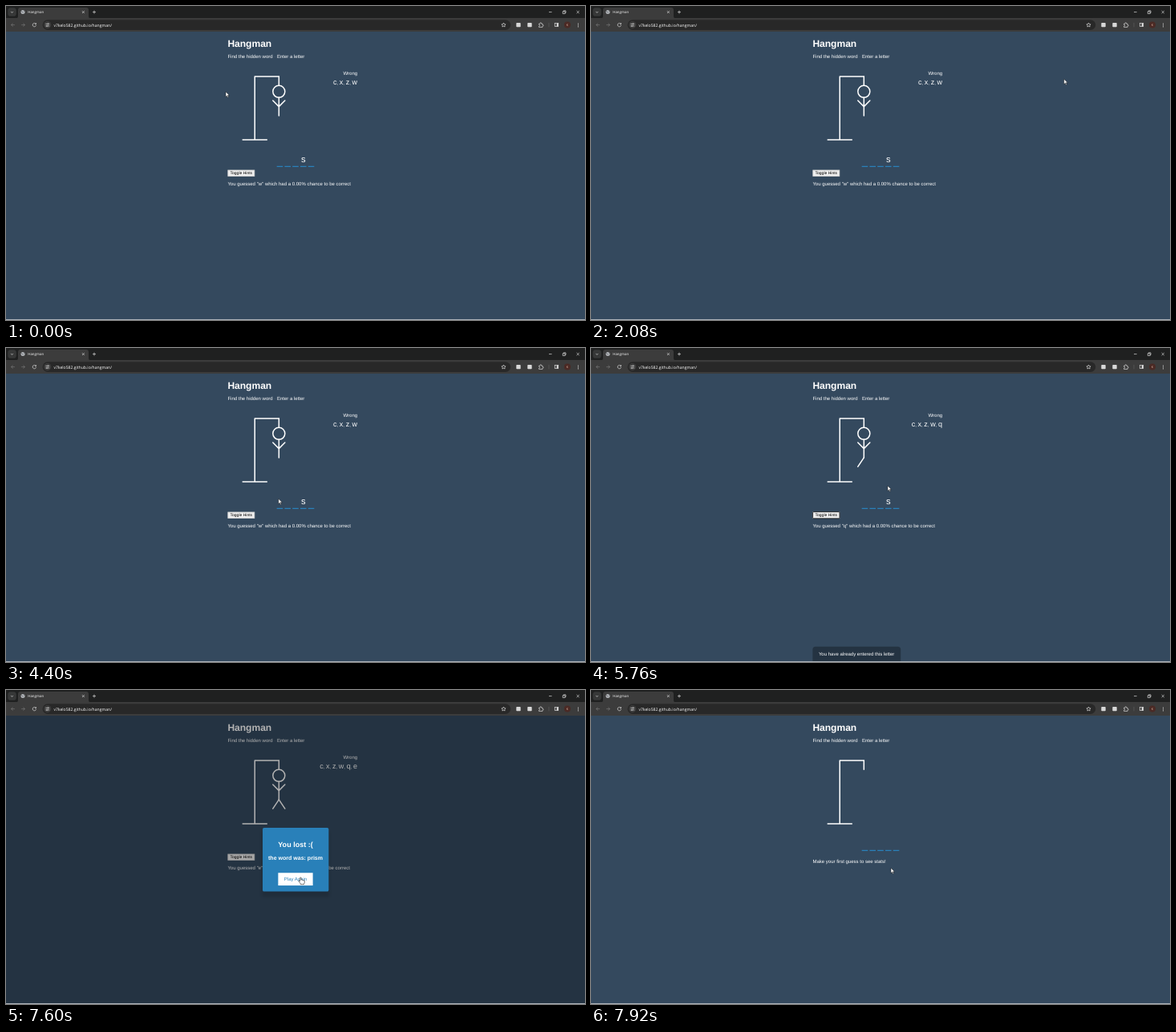
Write an HTML page that moves like this. It is 722 px wide and 392 px high and loops after 8 s.

```html
<!DOCTYPE html>
<html lang="en">
<head>
<meta charset="utf-8">
<title>Hangman</title>
<style>
html, body { margin: 0; width: 100%; height: 100%; overflow: hidden; background: #34495e; }
svg { display: block; width: 722px; height: 392px; }
text { font-family: "Liberation Sans", Arial, sans-serif; font-size: 16px; fill: #fff; white-space: pre; text-rendering: geometricPrecision; }
.ui text { font-family: "Open Sans", "Noto Sans", sans-serif; }
.mid { text-anchor: middle; }
.bold { font-weight: bold; }
.line { fill: none; stroke: #fff; stroke-width: 4; stroke-linecap: round; }
.icon { fill: none; stroke: #dcdcdc; stroke-width: .7; }
</style>
</head>
<body>
<svg viewBox="0 0 722 392">
  <defs>
    <clipPath id="view"><rect y="85" width="1920" height="955"/></clipPath>
    <filter id="shade" x="-20%" y="-20%" width="140%" height="150%"><feGaussianBlur stdDeviation="5"/></filter>
  </defs>

  <rect width="722" height="392" fill="#34495e"/>

  <g transform="scale(.37604)" clip-path="url(#view)">
    <text class="bold" x="735" y="136" style="font-size:32px">Hangman</text>
    <text x="735" y="174">Find the hidden word <tspan fill-opacity=".2">-</tspan> Enter a letter</text>
    <g class="line" transform="translate(765 214)">
      <path d="M60 20H140V50M60 20V230M20 230H100"/>
      <g id="man">
        <circle cx="140" cy="70" r="20"/>
        <path d="M140 90V150M120 100L140 120L160 100"/>
      </g>
      <path id="legA" d="M140 150L120 180"/>
      <path id="legB" d="M140 150L160 180"/>
    </g>
    <g id="wrong" text-anchor="end">
      <text x="1165" y="228.5">Wrong</text>
      <text id="list" x="1165" y="259.5"></text>
    </g>
    <text id="found" class="mid" x="986" y="518.5" style="font-size:30px">s</text>
    <path d="M898 533h124" stroke="#2980b9" stroke-width="3" stroke-dasharray="20 6"/>
    <g id="toggle">
      <rect x="736" y="545" width="88" height="20" fill="#efefef" stroke="#cfcfcf" stroke-width="2"/>
      <rect id="ring" x="735.5" y="544" width="89" height="22" rx="3" fill="none" stroke="#101010" stroke-width="2"/>
      <text class="mid" x="780" y="559.5" style="font-size:13.33px;fill:#000">Toggle Hints</text>
    </g>
    <text id="stats" x="735"></text>

    <g id="popup">
      <rect y="85" width="1920" height="955" fill-opacity=".3"/>
      <rect x="848" y="470" width="225" height="217" rx="5" fill-opacity=".13" filter="url(#shade)"/>
      <rect x="851" y="457.5" width="219" height="211.5" rx="5" fill="#2980b9"/>
      <text class="mid bold" x="960" y="520" style="font-size:24px">You lost :(</text>
      <text class="mid bold" x="960" y="563" style="font-size:18.72px">the word was: prism</text>
      <rect x="902.5" y="607" width="115" height="42" fill="#fff"/>
      <text class="mid" x="960" y="633" style="fill:#2980b9">Play Again</text>
    </g>

    <g id="note">
      <path d="M735 1041V1001a10 10 0 0 1 10-10H1017a10 10 0 0 1 10 10V1041Z" fill-opacity=".3"/>
      <text x="755" y="1021">You have already entered this letter</text>
    </g>
  </g>
  <rect y="391" width="722" height="1" fill="#aab1b8"/>

  <g class="ui">
    <rect width="722" height="15.5" fill="#1f2020"/>
    <rect y="15" width="722" height="17" fill="#3c3c3c"/>
    <path d="M12.5 15.2q2.5 0 2.5-2.5V5q0-3 3-3H100q3 0 3 3V12.7q0 2.5 2.5 2.5Z" fill="#3c3c3c"/>
    <rect x="2.3" y="2.3" width="10.5" height="10.5" rx="3.4" fill="#373838"/>
    <circle cx="21" cy="7.6" r="2.5" fill="#b9bcc0"/>
    <path d="M19 6.7l1.8 .6l.6 1.6M21.8 5.4l1 1.5" class="icon" style="stroke:#55585c"/>
    <text x="27.2" y="9.3" style="font-size:4.4px">Hangman</text>
    <rect x="45.6" y="17.3" width="583.6" height="12.6" rx="6.3" fill="#282828"/>
    <circle cx="51.7" cy="23.6" r="4.6" fill="#3c3c3c"/>
    <text x="59.4" y="25.6" style="font-size:5.1px">v7kelo582.github.io/hangman/</text>
    <g class="icon">
      <path d="M6.1 7l1.4 1.4l1.4-1.4M95 6.2l2.8 2.8M97.8 6.2l-2.8 2.8M108 7.6h4M110 5.6v4"/>
      <path d="M677 7.6h3.6M694.3 6.8h2.8v2.8h-2.8ZM695.2 6.8v-.9h2.8v2.8h-.9M711.6 6l3.2 3.2M714.8 6l-3.2 3.2"/>
      <path d="M10.8 23.6H6.6M8.5 21.6l-2 2l2 2M19.2 23.6h4.2M21.5 21.6l2 2l-2 2" stroke="#777"/>
      <path d="M37.2 22.4a2.2 2.2 0 1 0 .3 1.8M37.5 21.2v1.6h-1.6"/>
      <path d="M49.4 22.4h2.2M49.4 24.9h1M52 24.9h2.2M53.2 22.4h1"/>
      <circle cx="52.4" cy="22.4" r=".7"/><circle cx="51.1" cy="24.9" r=".7"/>
      <path d="M620.5 21l.8 1.7l1.8 .2l-1.3 1.3l.3 1.8l-1.6-.9l-1.6 .9l.3-1.8l-1.3-1.3l1.8-.2Z"/>
      <path d="M664.6 22.2h1.2q0-1.4 1-1.4t1 1.4h1.2v1.2q1.1 0 1.1 .9t-1.1 .9v1.2h-4.4v-1.3q1 0 1-.9t-1-.9Z"/>
      <path d="M677 20.8v5.6" stroke="#5c5c5c"/>
      <rect x="684.3" y="21.6" width="4.4" height="4"/>
    </g>
    <rect x="686.7" y="21.6" width="2" height="4" fill="#dcdcdc"/>
    <rect x="636.3" y="20.9" width="5.4" height="5.4" rx=".8" fill="#d8d8d8"/>
    <rect x="650.3" y="20.9" width="5.4" height="5.4" rx=".8" fill="#d8d8d8"/>
    <circle cx="700" cy="23.6" r="4" fill="#4b2a25"/>
    <text class="mid" x="700" y="25" style="font-size:3.8px;fill:#e8b9a6">K</text>
    <path d="M713.5 21.6v5" stroke="#dcdcdc" stroke-width="1" stroke-dasharray="1 .9"/>
  </g>

  <g id="cursor">
    <path id="arrow" transform="scale(.376)" d="M0 0V17L4 13.2L6.6 19.2L9.2 18L6.6 12.2H12Z" fill="#fff" stroke="#111" stroke-width="1.2"/>
    <path id="hand" transform="scale(.376)" d="M-2 12V2Q-2 0 0 0T2 2V8Q5 6.6 6 9Q9 8 9.5 10.3Q13 9.6 13 12.5V16Q13 19 11 21V23H0V21L-5.5 14Q-7.5 10.5-4.6 10.6Z" fill="#fff" stroke="#111" stroke-width="1.5"/>
  </g>
</svg>
<script>
const LOOP = 8000, STEP = 80;
const $ = id => document.getElementById(id);
const show = (id, on) => $(id).setAttribute('display', on ? 'inline' : 'none');
const clamp = v => Math.max(0, Math.min(1, v));
const ease = v => v * v * (3 - 2 * v);

// time, x, y of the pointer tip
const path = [
  [0, 274, 107], [560, 274, 107], [960, 284, 113],
  [1120, 284, 113], [1360, 440, 101], [1520, 586, 85], [1600, 596.5, 88],
  [1840, 596.5, 88], [2080, 589.8, 91.2],
  [2400, 589.8, 91.2], [2720, 430, 154], [3040, 298, 208],
  [4160, 298, 208], [4400, 339.8, 188.2], [4640, 370, 172],
  [6880, 370, 172], [7200, 384, 205], [7440, 367.4, 234],
  [7760, 367.4, 234], [7920, 374, 222.2], [LOOP, 374, 222.2]
];

// time, last guess, wrong letters
const guesses = [
  [0, 'w', 'cxzw'], [5360, 'x', 'cxzw'], [5760, 'q', 'cxzwq'], [6480, 'e', 'cxzwqe']
];

function pointer(t) {
  const i = path.findIndex(p => p[0] > t);
  const [t0, x0, y0] = path[i - 1], [t1, x1, y1] = path[i];
  const k = (t - t0) / (t1 - t0);
  return [x0 + (x1 - x0) * k, y0 + (y1 - y0) * k];
}

function draw(t) {
  const fresh = t >= 7680;
  const lost = t >= 6480 && !fresh;
  const [, letter, wrong] = guesses.filter(g => g[0] <= t).pop();

  for (const id of ['man', 'wrong', 'found', 'toggle']) show(id, !fresh);
  show('legA', !fresh && wrong.length > 4);
  show('legB', lost);
  show('popup', lost);
  show('ring', t >= 4720 && t < 7600);

  $('list').innerHTML = [...wrong].map(c => `<tspan style="font-size:24px">${c}</tspan>`).join(', ');
  $('stats').textContent = fresh
    ? 'Make your first guess to see stats!'
    : `You guessed "${letter}" which had a 0.00% chance to be correct`;
  $('stats').setAttribute('y', fresh ? 574 : 596);

  const up = ease(clamp((t - 4680) / 300)) - ease(clamp((t - 6680) / 300));
  $('note').setAttribute('transform', `translate(0 ${50 * (1 - up)})`);
  show('note', up > 0);

  const [x, y] = pointer(t);
  const onButton = lost && y >= 228;
  show('arrow', !onButton);
  show('hand', onButton);
  $('cursor').setAttribute('transform', `translate(${x} ${y})`);
}

let start = null;
function tick(now) {
  if (start === null) start = now;
  const t = (now - start) % LOOP;
  draw(Math.floor(t / STEP) * STEP);
  requestAnimationFrame(tick);
}
draw(0);
requestAnimationFrame(tick);
</script>
</body>
</html>
```
